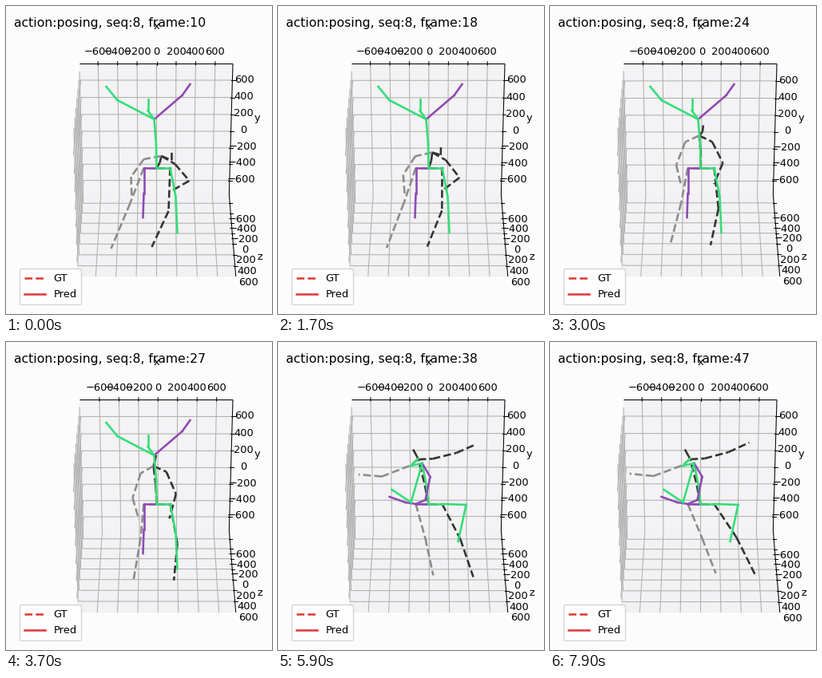
Recreate the animation shown at these times as a matplotlib script. Size 333 px wide and 386 px high, loop 8 s.

```python
import numpy as np
import matplotlib.pyplot as plt
from matplotlib.animation import FuncAnimation

W, H = 333, 386
FRAMES, INTERVAL = 80, 100
LABELS_PER_TICK = 0.465      # plot updates per animation frame
CX, CY = 188, 203            # screen position of the root joint
FOCAL, DIST = 1868, 10
SIN, COS = np.sin(np.pi / 3), np.cos(np.pi / 3)
SPAN = 1500                  # data range of each axis
E = 0.5 * 25 / 24            # half edge of the box with margin
LW, THIN = 1.88, 0.75

GREEN, PURPLE, RED = "#36dd78", "#8f4bb4", "#de3d3d"
DARK, GRAY = "#333333", "#8c8c8c"

plt.rcParams["font.family"] = "DejaVu Sans"
plt.rcParams["font.size"] = 9.4

fig = plt.figure(figsize=(W / 100, H / 100), dpi=100, facecolor="#fdfcfd")
ax = fig.add_axes([0, 0, 1, 1])
ax.set(xlim=(-0.5, W - 0.5), ylim=(H, 0))
ax.axis("off")


def project(points):
    """Perspective view of box coordinates, as screen x and y."""
    x, y, z = np.asarray(points, float).T
    scale = FOCAL / (DIST - COS * y - SIN * z)
    return CX + x * scale, CY - (SIN * y - COS * z) * scale


def edge_point(axis, t, reach):
    """Point at t on the ticked edge of an axis, moved out to reach."""
    x, y, z = [(t, reach, -reach), (reach, t, -reach), (reach, -reach, t)][axis]
    return x, y, z


def tick_path(axis, t):
    """Short stroke across the edge: upward for x, sideways for y and z."""
    ends = []
    for shift in (-0.0087, 0.0174):
        p = list(edge_point(axis, t, E))
        p[1 if axis == 0 else 0] += shift
        ends.append(p)
    return ends


def grid_path(axis, t):
    """Line over the two panes that cross the axis at t."""
    corners = [
        [(E, -E), (-E, -E), (-E, E)],
        [(-E, E), (-E, -E), (E, -E)],
        [(-E, E), (-E, -E), (E, -E)],
    ][axis]
    return [np.insert(c, axis, t) for c in corners]


def stroke(color, lw, z, **kw):
    return ax.plot([], [], color=color, lw=lw, zorder=z, **kw)[0]


PANES = {
    "#f5f4f6": [(-E, E, -E), (-E, -E, -E), (-E, -E, E), (-E, E, E)],
    "#f2f1f3": [(-E, -E, -E), (E, -E, -E), (E, -E, E), (-E, -E, E)],
    "#f3f2f4": [(-E, E, -E), (E, E, -E), (E, -E, -E), (-E, -E, -E)],
}
for shade, corners in PANES.items():
    ax.fill(*project(corners), color=shade, lw=0.8, zorder=0)
ax.plot(*project([(-E, E, -E), (E, E, -E), (E, -E, -E), (E, -E, E)]),
        color="black", lw=THIN, zorder=2)

marks = []
for axis, name in enumerate("xyz"):
    (px,), (py,) = project([edge_point(axis, 0, E + 0.195)])
    ax.text(px, py, name, ha="center", va="center")
    for value in range(-600, 601, 200):
        text = ax.text(0, 0, str(value).replace("-", "\u2212"),
                       ha="center", va="top")
        marks.append((axis, value, stroke("#b0b0b0", THIN, 1),
                      stroke("black", THIN, 2), text))

HIP, LEFT_HIP, RIGHT_HIP = (CX, CY), (172, CY), (205, CY)


def ease(step, start, end):
    u = np.clip((step - start) / (end - start), 0, 1)
    return u * u * (3 - 2 * u)


def root_at(step):
    """Small sway of the root, which shifts the ticks around it."""
    sway = np.exp(-((step - 19.5) / 9) ** 2)
    bob = np.exp(-((step - 13) / 5) ** 2)
    return -16 * sway, 5 + 9 * bob, 10 * sway


def body(legs, torso, arms, colors):
    """Limbs as colour and joints; legs and arms go left, then right."""
    neck = np.array(torso[0])
    spine = (neck + HIP) / 2 + (1, 1)
    left, right = colors
    return [
        (left, [HIP, LEFT_HIP, *legs[0]]),
        (right, [HIP, RIGHT_HIP, *legs[1]]),
        (right, [HIP, spine, *torso]),
        (left, [neck, *arms[0]]),
        (right, [neck, *arms[1]]),
    ]


def true_body(step):
    """Bent over, then upright with hanging arms, then arms spread."""
    rise, lift = ease(step, 5, 18), ease(step, 17, 29)
    swing = ease(step, 3, 37)

    def upper(bent, upright, spread):
        a, b, c = np.array([bent, upright, spread], float)
        return a + (b - a) * rise + (c - b) * lift

    def leg(first, last):
        a, b = np.array([first, last], float)
        return a + (b - a) * swing

    torso = upper([(194, 188), (206, 193), (206, 179)],
                  [(184, 155), (186, 147), (187, 141)],
                  [(175, 147), (173, 143), (168, 134)])
    left_arm = upper([(172, 192), (156, 214), (157, 241)],
                     [(168, 164), (158, 195), (166, 222)],
                     [(164, 155), (129, 168), (99, 165)])
    right_arm = upper([(211, 198), (229, 219), (208, 231)],
                      [(200, 162), (212, 190), (204, 221)],
                      [(193, 146), (223, 138), (249, 126)])
    left_leg = leg([(155, 247), (131, 304)], [(190, 246), (207, 290)])
    right_leg = leg([(203, 257), (182, 302)], [(233, 245), (257, 293)])
    return body((left_leg, right_leg), torso, (left_arm, right_arm),
                (GRAY, DARK))


RAISED = body(
    legs=([(172, 235), (171, 265)], [(212, 239), (214, 284)]),
    torso=[(185, 142), (177, 131), (177, 117)],
    arms=([(220, 112), (230, 98)], [(139, 118), (125, 101)]),
    colors=(PURPLE, GREEN))
SEATED = body(
    legs=([(159, 201), (139, 194)], [(235, 204), (225, 250)]),
    torso=[(180, 152), (166, 155), (175, 146)],
    arms=([(190, 169), (184, 198), LEFT_HIP], [(166, 201), (142, 185)]),
    colors=(PURPLE, GREEN))
SWITCH = 20                  # the prediction jumps to the seated pose


def draw_bones(lines, limbs):
    bones = [(color, a, b) for color, joints in limbs
             for a, b in zip(joints, joints[1:])]
    for line in lines[len(bones):]:
        line.set_data([], [])
    for line, (color, a, b) in zip(lines, bones):
        line.set_color(color)
        line.set_data(*zip(a, b))


true_lines = [stroke(GRAY, LW, 4, ls="--") for _ in range(16)]
pred_lines = [stroke(GREEN, LW, 5) for _ in range(16)]

title = ax.text(129.5, 26, "", ha="center", va="baseline", fontsize=11.28)
ax.legend(handles=[stroke(RED, LW, 1, ls="--", label="GT"),
                   stroke(RED, LW, 1, label="Pred")],
          loc="lower left", bbox_to_anchor=(17 / W, 1 - 374.3 / H),
          borderaxespad=0, borderpad=0.45, labelspacing=0.55)


def update(i):
    step = int(LABELS_PER_TICK * i + 0.65)
    title.set_text(f"action:posing, seq:8, frame:{10 + step}")
    root = root_at(step)
    for axis, value, grid, tick, text in marks:
        t = (value - root[axis]) / SPAN
        grid.set_data(*project(grid_path(axis, t)))
        tick.set_data(*project(tick_path(axis, t)))
        (px,), (py,) = project([edge_point(axis, t, E + 0.09)])
        text.set_position((px, py))
    draw_bones(true_lines, true_body(step))
    draw_bones(pred_lines, RAISED if step < SWITCH else SEATED)
    return []


anim = FuncAnimation(fig, update, frames=FRAMES, interval=INTERVAL,
                     init_func=lambda: update(0), repeat=True,
                     repeat_delay=0, blit=False)
plt.show()
```
